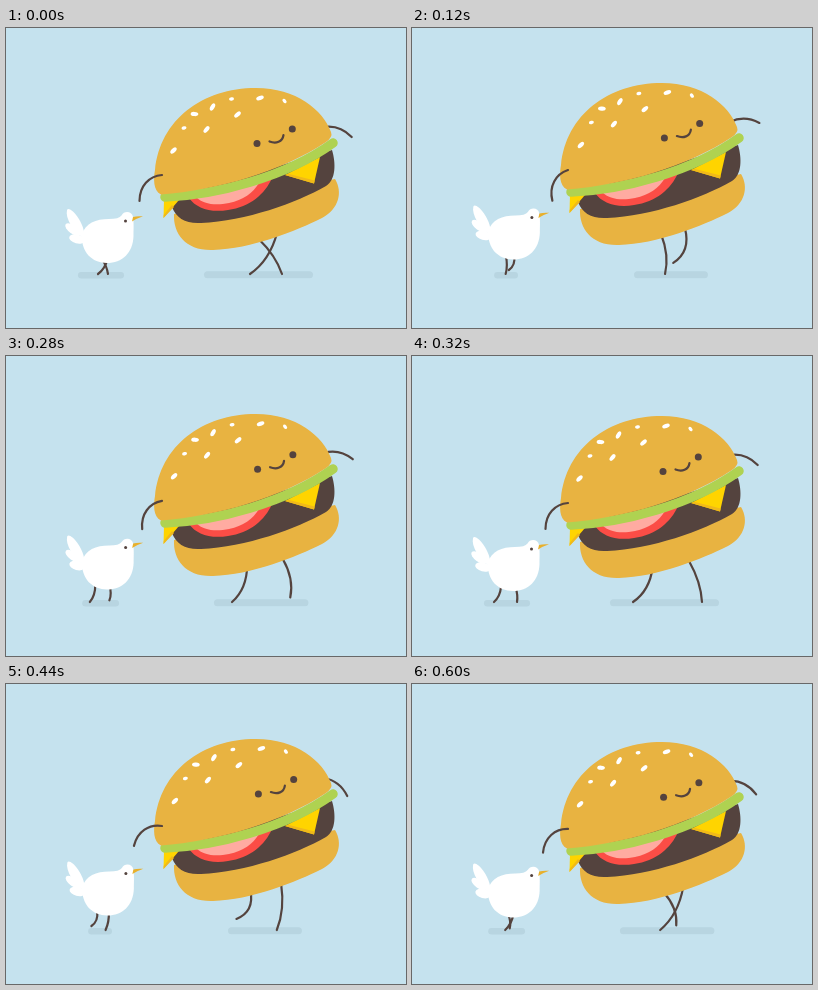
An HTML page for the animation above (640 ms loop, 400x300 px).

```html
<!DOCTYPE html>
<html>
<head>
<meta charset="utf-8">
<style>
  html, body { margin: 0; height: 100%; overflow: hidden; background: #c5e2ee; }
  svg { display: block; width: 100vw; height: 100vh; }
  .line { fill: none; stroke: #54433e; stroke-width: 2.2; stroke-linecap: round; }
  .bun { fill: #e8b341; }
  .dark { fill: #54433e; }
  .shadow { fill: #b8d5e1; }
</style>
</head>
<body>
<svg viewBox="0 0 400 300">
  <rect id="birdShadow" class="shadow" y="244" height="6.5" rx="3.2"/>
  <rect id="burgerShadow" class="shadow" y="243.3" height="7" rx="3.5"/>

  <path id="birdLegL" class="line"/>
  <path id="birdLegR" class="line"/>
  <g id="bird" fill="#fff">
    <path d="M77 210C67 203 59 190 61 182C63 177 76 191 78 204Z"/>
    <ellipse cx="67" cy="201.5" rx="9" ry="4.2" transform="rotate(35 67 201.5)"/>
    <ellipse cx="71" cy="211" rx="8" ry="4.5" transform="rotate(15 71 211)"/>
    <path d="M76 207C79 195 90 191 103 191Q113 191 115.5 187.5C118 182.500 126 183 127 189C128 195 127.5 203 127.5 208C127 225 116 235 101 235C86 235 75 224 76 207Z"/>
    <path d="M127 189Q131 187.800 137 188.300Q131 190.300 126 193.500Z" fill="#e8b02c"/>
    <circle cx="119.500" cy="193" r="1.5" class="dark"/>
  </g>

  <path id="legL" class="line"/>
  <path id="legR" class="line"/>
  <g id="burger">
    <path id="armR" class="line" d="M318 99Q333 94 347 104"/>
    <path class="bun" d="M168 186C167 206 180 223 207 222C245 221 290 203 316 190C333 181 337 164 329 151Z"/>
    <path class="dark" d="M166 179C170 190 180 196 195 195C240 193 290 175 320 158C330 152 330 135 326 122L166 170Z"/>
    <path d="M158 172L157.500 190L173 172Z" fill="#ffd400"/>
    <path d="M157.500 190L168 179L166 177L157.700 187Z" fill="#f0b91a"/>
    <path d="M279 147L308 155.500L314 129Z" fill="#ffd400"/>
    <path d="M279 147L308 155.500L308.700 152.500L283 146Z" fill="#f0b91a"/>
    <path d="M183 170C190 180 204 185 222 182C244 179 259 166 266 150Z" fill="#fb4d46"/>
    <path d="M190 169C197 176 209 178 223 175C237 172 247 165 253 155Z" fill="#ffaba1"/>
    <path d="M159 169C210 167 280 149 327 115" fill="none" stroke="#afd251" stroke-width="9.5" stroke-linecap="round"/>
    <path class="bun" d="M155 166.500C147 163 147.500 150 149 142C154 92 196 60 250 60C290 60 317 82 325 104Q327 109 320 114C275 144 212 162 155 166.500Z"/>
    <g id="top">
      <g id="seeds" fill="#fff"></g>
      <circle cx="251" cy="115.5" r="3.5" class="dark"/>
      <circle cx="286.300" cy="101" r="3.5" class="dark"/>
      <path class="line" d="M263.500 113.500C270 116 276.500 114 277.500 107"/>
    </g>
    <path id="armL" class="line" d="M156 147C143 148 133.500 158 133.500 173"/>
  </g>
</svg>
<script>
const LOOP = 640, STEP = 40, GROUND = 246;
const el = id => document.getElementById(id);
const set = (id, attrs) => {
  for (const k in attrs) el(id).setAttribute(k, attrs[k]);
};
const move = (id, x, y) => set(id, { transform: `translate(${x} ${y})` });
const rotate = (id, a, x, y) => set(id, { transform: `rotate(${a} ${x} ${y})` });
const shadow = (id, left, right) => set(id, { x: left, width: right - left });

// x, y, angle; every third seed is small
el('seeds').innerHTML = [
  [167.5, 122.5, -45], [178, 100, -10], [188.5, 86, 5],
  [206.5, 79, -60], [225.5, 71, -8], [231.5, 86.5, -40],
  [254, 70, -18], [278.5, 73, 50], [200.5, 101.5, -50]
].map(([x, y, a], i) => {
  const [rx, ry] = i % 3 == 1 ? [2.5, 1.7] : [3.9, 2.1];
  return `<ellipse cx="${x}" cy="${y}" rx="${rx}" ry="${ry}" transform="rotate(${a} ${x} ${y})"/>`;
}).join('');

// The foot slides from front to back, then swings forward through the air.
function leg(id, phase, hipX, hipY, front, back, ease, size) {
  const u = phase % 1 * 2, swing = u > 1;
  const k = swing ? 1 - (u - 1) ** ease : 1 - (1 - u) ** 1.15;
  const lift = swing ? 12 * Math.sin(Math.PI * (u - 1)) : 0;
  const bend = (7 - 2 * Math.cos(2 * Math.PI * phase) + lift / 2) * size;

  const x = back + (front - back) * (1 - k), y = GROUND - lift * size;
  const dx = x - hipX, dy = y - hipY, len = Math.hypot(dx, dy);
  const kneeX = hipX + dx * 0.55 + dy / len * bend;
  const kneeY = hipY + dy * 0.55 - dx / len * bend;
  set(id, { d: `M${hipX} ${hipY}Q${kneeX} ${kneeY} ${x} ${y}` });
}

function draw(now) {
  const phase = Math.floor(now % LOOP / STEP) * STEP / LOOP;
  const w = 2 * Math.PI * phase, sin = Math.sin(w), cos = Math.cos(w);
  const up = Math.abs(sin), bob = 5.4 * up, birdBob = 3.8 * up;

  move('burger', 0, -bob);
  move('top', 1.5 * up, -0.5 * up);
  move('bird', 0.4 * up, -birdBob);
  shadow('burgerShadow', 198 + 26 * up, 307 - 12 * up);
  shadow('birdShadow', 72 + 11 * up, 118 - 13 * up);
  rotate('armL', -15 * sin, 156, 147);
  rotate('armR', 10 - 19.5 * sin, 318, 99);

  leg('legL', phase, 246.7 + 6 * cos, 211 - bob, 276, 221, 1.8, 1);
  leg('legR', phase + 0.5, 274 - 3 * cos, 205 - bob, 290, 244, 1, 1);
  leg('birdLegL', phase, 92.5 + 3.5 * cos, 231 - birdBob, 102, 82, 1.8, 0.36);
  leg('birdLegR', phase + 0.5, 102.5 - cos, 231 - birdBob, 105, 92, 1, 0.36);
}

function tick() {
  draw(performance.now());
  requestAnimationFrame(tick);
}
tick();
</script>
</body>
</html>
```
